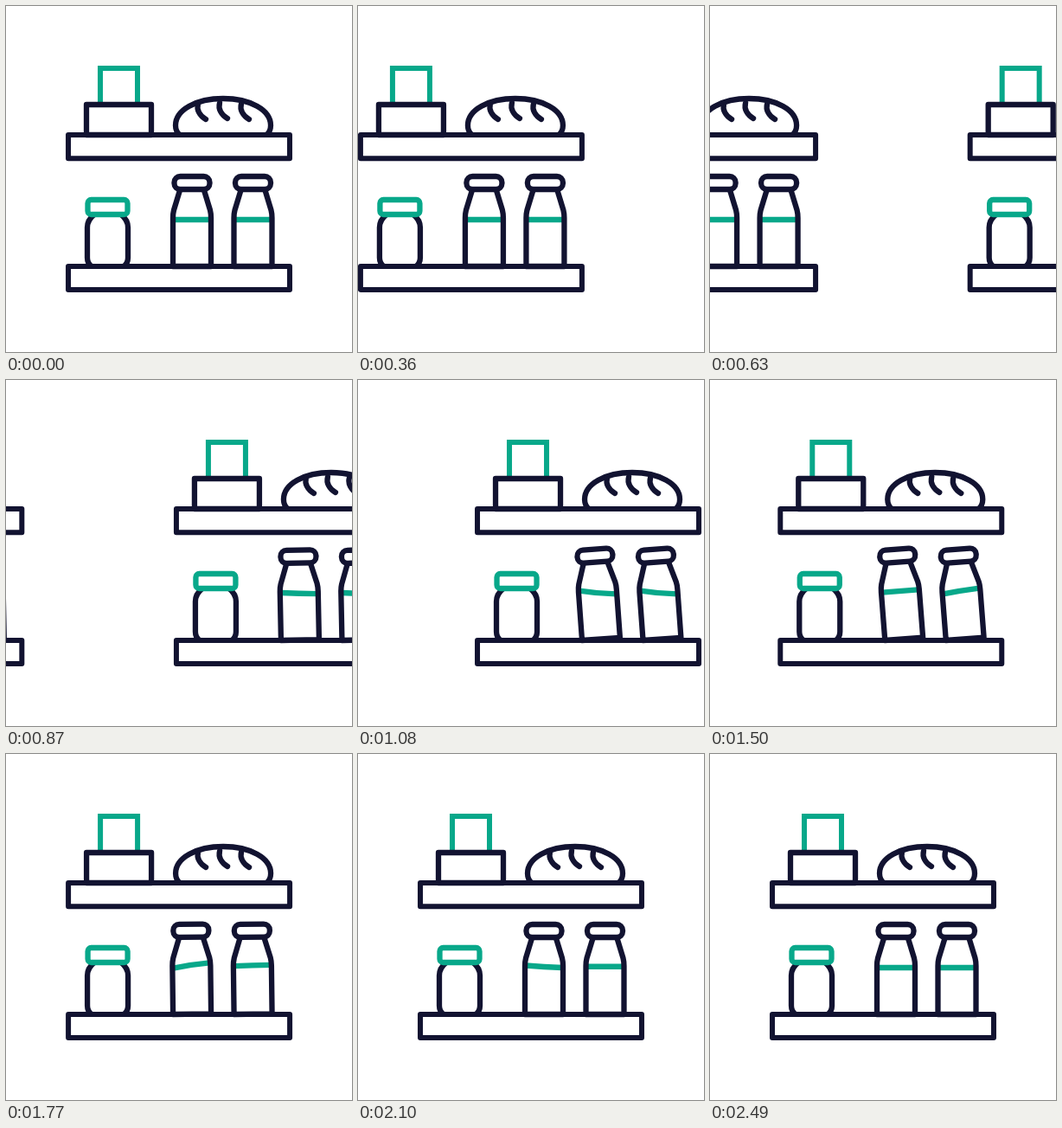
Write an HTML page that moves like this. It is 400 px wide and 400 px high and loops after 4.92 s.

```html
<!DOCTYPE html>
<html lang="en">
<head>
<meta charset="utf-8">
<title>Grocery shelves</title>
<style>
  html, body { margin: 0; width: 100%; height: 100%; overflow: hidden; background: #fff; }
  svg { display: block; width: 100vw; height: 100vh; }
  .ink { stroke: #121331; stroke-linejoin: round; }
  .mint { stroke: #08a88a; }
</style>
</head>
<body>
<svg viewBox="0 0 400 400">
  <defs>
    <g id="bottle" class="ink">
      <path d="M201 213L194 236Q193 240 193 245V301H237V245Q237 240 236 236L229 213"/>
      <rect x="194.5" y="197" width="41" height="15" rx="7"/>
    </g>
    <path id="score" d="M0 0C-2 7 2 14 9 18"/>
    <path id="jarSide" d="M102 241C97 245 94 250 94 256V291C94 296 96 299 99 301"/>
    <g id="shelves" fill="none" stroke-width="6.3">
      <path class="mint" stroke-width="6" d="M109 111V72H152V111"/>
      <g class="ink">
        <rect x="93" y="114" width="75" height="35"/>
        <path d="M201 149C197 146 196 143 196 138C196 120 220 107 251 107S306 120 306 138C306 143 305 146 301 149"/>
        <g stroke-linecap="round">
          <use href="#score" x="222" y="113"/>
          <use href="#score" x="247" y="112"/>
          <use href="#score" x="272" y="113"/>
        </g>
        <use href="#jarSide"/>
        <use href="#jarSide" transform="matrix(-1 0 0 1 235 0)"/>
      </g>
      <rect class="mint" x="94.5" y="224" width="46" height="17" rx="4"/>
      <g class="tilt"><path class="mint liquid"/><use href="#bottle"/></g>
      <g transform="translate(70.5 0)">
        <g class="tilt"><path class="mint liquid"/><use href="#bottle"/></g>
      </g>
      <g class="ink" stroke-width="6">
        <rect x="72" y="149" width="256" height="27.300"/>
        <rect x="72" y="301" width="256" height="27"/>
      </g>
    </g>
  </defs>
  <use id="leaving" href="#shelves"/>
  <use id="arriving" href="#shelves"/>
</svg>
<script>
  const LOOP = 4920, STEP = 30, SETTLED = 2490;
  const SLIDE = 1800, SPACING = 434.6;
  const PEAK = 1300, RISE = 600;      // strongest lean, and time to reach it
  const LEAN = 6, SWING = 10;
  const PERIODS = [800, 640];         // slosh period of each bottle

  const leaving = document.getElementById('leaving');
  const arriving = document.getElementById('arriving');
  const tilts = document.querySelectorAll('.tilt');
  const liquids = document.querySelectorAll('.liquid');

  const smooth = p => p * p * (3 - 2 * p);

  // Eased bump: 0 to 1 at the peak, then back to 0
  function pulse(t, peak, rise, fall) {
    const d = t - peak;
    return smooth(Math.max(0, 1 - Math.abs(d) / (d < 0 ? rise : fall)));
  }

  // cubic-bezier(1/3, 0, 0.3, 1), solved by bisection
  function glide(x) {
    if (x >= 1) return 1;
    let lo = 0, hi = 1;
    for (let i = 0; i < 24; i++) {
      const s = (lo + hi) / 2, r = 1 - s;
      const at = s * r * r + 0.9 * s * s * r + s * s * s;
      if (at < x) lo = s; else hi = s;
    }
    return smooth(lo);
  }

  // The surface tips with the lean, then rocks back and forth as it settles
  function surface(t, period) {
    const phase = 2 * Math.PI * Math.max(0, t - PEAK) / period;
    const swing = SWING * pulse(t, PEAK, RISE, SETTLED - PEAK) * Math.cos(phase);
    const y = 247 - 2.2 * pulse(t, 1770, 720, 720);
    return `M194 ${y - swing / 2}Q215 ${y + swing / 5} 236 ${y + swing / 2}`;
  }

  function draw(time) {
    const t = Math.min(Math.floor(time % LOOP / STEP) * STEP, SETTLED);
    const p = glide(t / SLIDE);
    leaving.setAttribute('x', -SPACING * p);
    arriving.setAttribute('x', SPACING * (1 - p));

    const angle = -LEAN * pulse(t, PEAK, RISE, RISE);
    tilts.forEach(g => g.setAttribute('transform', `rotate(${angle} 193 301)`));
    liquids.forEach((path, i) => path.setAttribute('d', surface(t, PERIODS[i])));
  }

  const start = performance.now();
  function tick() {
    draw(performance.now() - start);
    requestAnimationFrame(tick);
  }
  tick();
</script>
</body>
</html>
```
